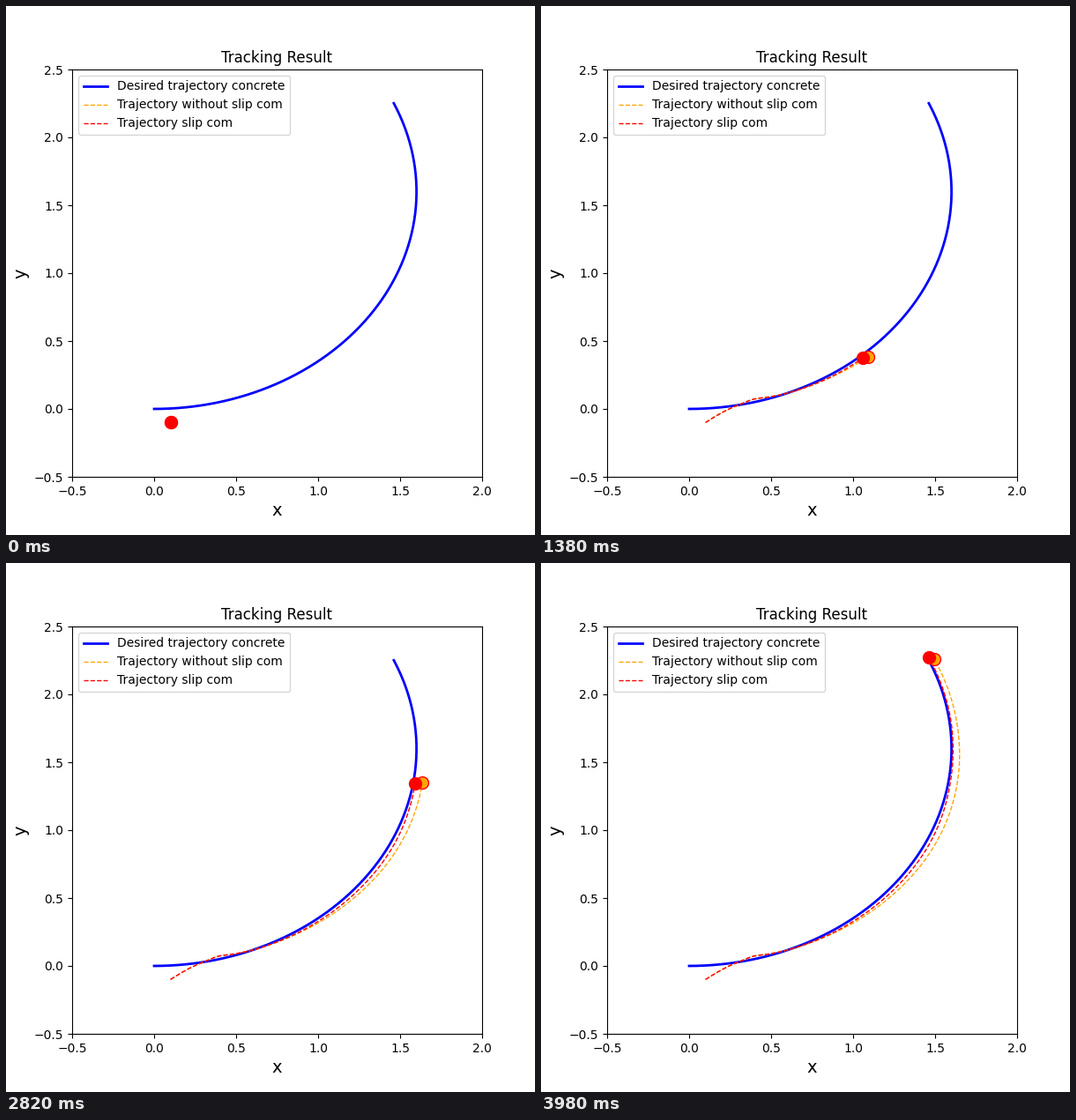
Animation, 600 px wide and 600 px high, one loop 4000 ms. Source, as a matplotlib script:

```python
import numpy as np
import matplotlib.pyplot as plt
from matplotlib.animation import FuncAnimation

COUNT = 200
RADIUS = 1.6

# Offsets from the blue arc at chosen steps
STEPS = [0, 5, 10, 15, 20, 27, 36, 54, 69, 81, 114, 141, 175, 199]
SLIP_DX = [.1, .094, .085, .076, .069, .061, .047, .042, .040, .034, .027, .013, .007, .0005]
SLIP_DY = [-.1, -.047, -.008, .018, .038, .030, .018, .009, .008, .003, .001, .003, .014, .021]
FREE_DX = [.1, .094, .085, .076, .069, .061, .050, .066, .071, .073, .067, .056, .041, .035]
FREE_DY = [-.1, -.047, -.008, .018, .038, .030, .019, .018, .017, .017, .008, .004, .007, .0055]


def smooth(values):
    """Cubic Hermite curve through the keyed values, one sample per step."""
    k, v = np.array(STEPS, float), np.array(values)
    slope = np.gradient(v, k)
    n = np.arange(COUNT)
    i = np.clip(np.searchsorted(k, n, side="right") - 1, 0, len(k) - 2)
    h = k[i + 1] - k[i]
    u = (n - k[i]) / h
    return ((1 + 2 * u) * (1 - u) ** 2 * v[i] + u * (1 - u) ** 2 * h * slope[i]
            + u * u * (3 - 2 * u) * v[i + 1] + u * u * (u - 1) * h * slope[i + 1])


theta = np.arange(COUNT) * 0.01
arc_x = RADIUS * np.sin(theta)
arc_y = RADIUS * (1 - np.cos(theta))
free = arc_x + smooth(FREE_DX), arc_y + smooth(FREE_DY)
slip = arc_x + smooth(SLIP_DX), arc_y + smooth(SLIP_DY)

fig, ax = plt.subplots(figsize=(6, 6), dpi=100)
ax.set_xlim(-0.5, 2.0)
ax.set_ylim(-0.5, 2.5)
ax.set_title("Tracking Result")
ax.set_xlabel("x", fontsize=14)
ax.set_ylabel("y", fontsize=14)

ax.plot(arc_x, arc_y, color="blue", lw=2, label="Desired trajectory concrete")
free_line, = ax.plot([], [], "--", color="orange", lw=1,
                     label="Trajectory without slip com")
slip_line, = ax.plot([], [], "--", color="red", lw=1, label="Trajectory slip com")
free_dot, = ax.plot([], [], "o", ms=10, mfc="orange", mec="red")
slip_dot, = ax.plot([], [], "o", ms=10, color="red")
ax.legend(loc="upper left")

tracks = [(free, free_line, free_dot), (slip, slip_line, slip_dot)]


def update(n):
    artists = []
    for (x, y), line, dot in tracks:
        line.set_data(x[:n + 1], y[:n + 1])
        dot.set_data([x[n]], [y[n]])
        artists += [line, dot]
    return artists


anim = FuncAnimation(fig, update, frames=COUNT, interval=20,
                     repeat=True, repeat_delay=0, blit=False)
plt.show()
```
